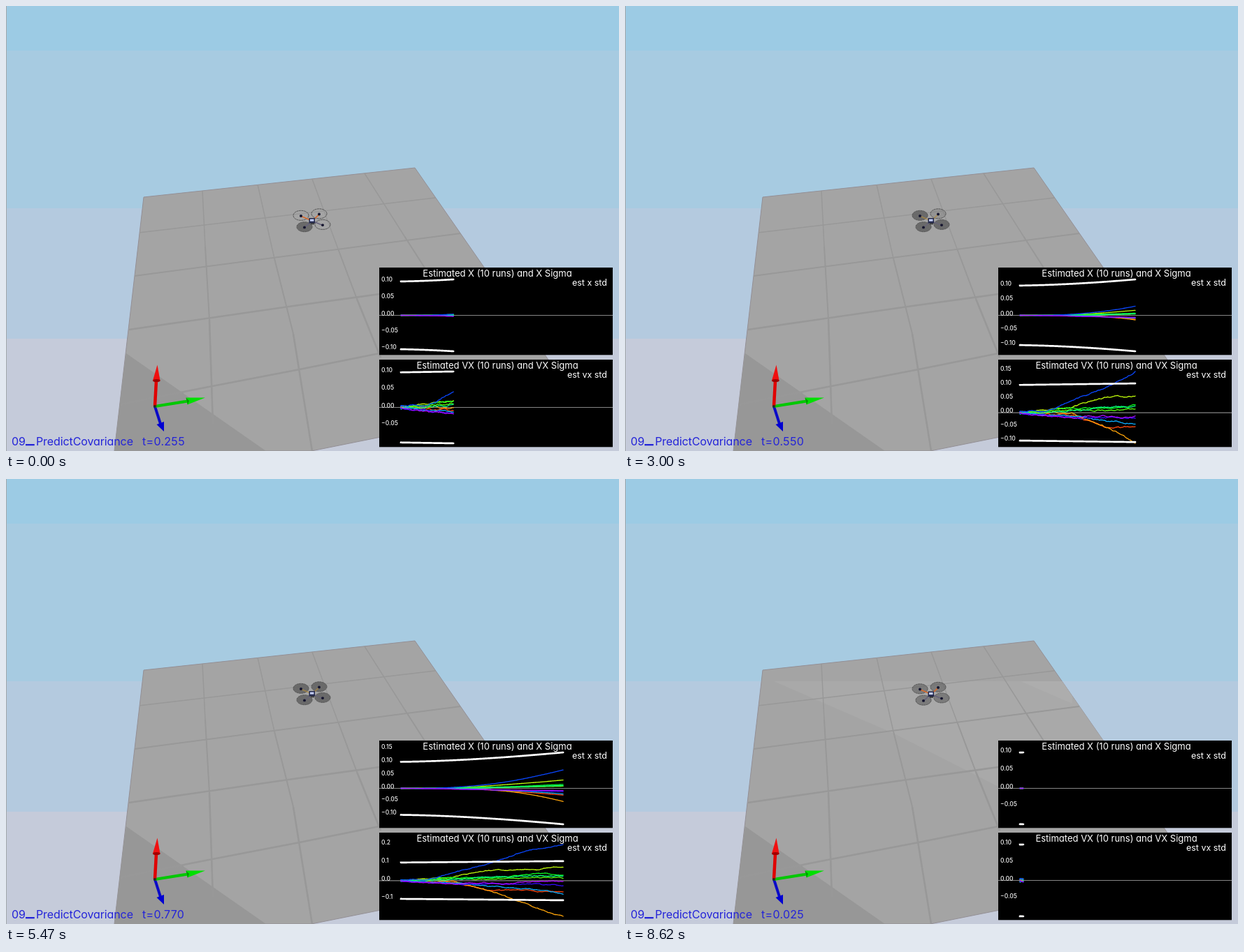
An HTML page for the animation above (8.72 s loop, 877 by 638 pixels).

```html
<!DOCTYPE html>
<html lang="en">
<head>
<meta charset="utf-8">
<title>Covariance prediction</title>
<style>
html, body { margin: 0; width: 100%; height: 100%; overflow: hidden; background: #a7cbe0; }
svg { display: block; width: 877px; height: 638px; }
text { font-family: Inter, "Open Sans", sans-serif; font-feature-settings: "cv11"; white-space: pre; }
.title { font-size: 13px; fill: #fff; text-anchor: middle; }
.legend { font-size: 12.5px; fill: #fff; text-anchor: end; }
.tick { font-size: 8.5px; font-weight: 500; fill: #f4f4f4; }
.status { font-size: 16px; fill: #2424d8; }
.run { fill: none; stroke-width: 1.3; stroke-linejoin: round; stroke-linecap: round; }
.std { fill: none; stroke: #fff; stroke-width: 2.7; stroke-linecap: round; }
.grid { fill: none; stroke: #989898; }
</style>
</head>
<body>
<svg id="stage" viewBox="0 0 877 638" xmlns="http://www.w3.org/2000/svg">
  <defs><clipPath id="floorClip"><path d="M197 274L585 232L814 562L437 638H155Z"/></clipPath></defs>
  <g id="sky">
    <rect width="877" height="64" fill="#9ccbe4"/>
    <rect y="64" width="877" height="226" fill="#a7cbe1"/>
    <rect y="290" width="877" height="187" fill="#b4cadf"/>
    <rect y="477" width="877" height="161" fill="#c5cbda"/>
    <rect width="1" height="638" fill="#a3a8ac"/>
  </g>
  <g id="floor">
    <path d="M197 274L585 232L814 562L437 638H155Z" fill="#a4a4a4" stroke="#938f95" stroke-width="1"/>
    <g clip-path="url(#floorClip)">
      <path id="glow" d="M213 290H640L700 390L534 441L385 365Z" fill="#a9a9a9"/>
      <path id="glow2" d="M566 290H640V322Z" fill="#adadad"/>
      <path d="M172 498L372 638H150Z" fill="#979797"/>
      <g class="grid">
        <path stroke-width="1.5" d="M281 265L285 345M360 256L384 362M438 248L475 348M513 240L570 330M190 325L614 275"/>
        <path stroke-width="2" d="M285 345L291 450M384 362L411 470M475 348L502 420M570 330L602 380M184 387L650 326"/>
        <path stroke-width="2.6" d="M291 450L296 600M411 470L438 638M502 420L536 504M176 464L411 430L534 413M160 572L290 546L420 521L534 498"/>
      </g>
    </g>
  </g>
  <g id="drone"></g>
  <g id="axes">
    <path d="M213 574L221 599" stroke="#0a0ac8" stroke-width="4"/>
    <path d="M215.5 600L226 596L226 610Z" fill="#0000d2"/>
    <path d="M213 574L260 566.5" stroke="#00c800" stroke-width="4"/>
    <path d="M257.5 561.5L285 561.5L259.500 571.500Z" fill="#00e000"/>
    <path d="M257.500 561.500L260 571.500L262 566Z" fill="#009800"/>
    <path d="M213 574L215 537" stroke="#e00000" stroke-width="4.500"/>
    <path d="M210 537L216.500 514.500L220.500 537Q215 541 210 537Z" fill="#f01010"/>
    <ellipse cx="215.300" cy="537" rx="5.300" ry="2" fill="#a00000"/>
    <circle cx="213" cy="574" r="2" fill="#203020"/>
  </g>
  <g id="plots"></g>
  <text class="status" y="630"><tspan x="8">09</tspan><tspan x="28" y="628" font-size="28">_</tspan><tspan x="43" y="630" letter-spacing="-.1">PredictCovariance</tspan></text>
  <text class="status" id="clock" x="195" y="630" letter-spacing=".3"></text>
</svg>
<script>
const LOOP = 8720, DT = 0.005, SAMPLES = 205;
const $ = id => document.getElementById(id);

function add(parent, tag, attrs, text) {
  const el = document.createElementNS('http://www.w3.org/2000/svg', tag);
  for (const k in attrs) el.setAttribute(k, attrs[k]);
  if (text !== undefined) el.textContent = text;
  parent.appendChild(el);
  return el;
}

// piecewise linear curve through (xs, ys)
function lerp(xs, ys, x) {
  let i = 1;
  while (i < xs.length - 1 && x > xs[i]) i++;
  const u = (x - xs[i - 1]) / (xs[i] - xs[i - 1]);
  return ys[i - 1] + (ys[i] - ys[i - 1]) * u;
}

let seed = 20;
function random() {
  seed = (seed * 1664525 + 1013904223) % 4294967296;
  return seed / 4294967296;
}

// picture changes: [first, last, count] in ms
const changes = [
  [150, 1100, 8], [1250, 2190, 8], [2340, 3260, 8], [3400, 4390, 8],
  [4530, 5470, 8], [5600, 6570, 8], [6710, 7620, 8], [7770, 8620, 7]
].flatMap(([a, b, n]) => Array.from({ length: n }, (_, i) => a + (b - a) * i / (n - 1)));

const stepKeys = [0, 13, 22, 30, 40, 56, 60, 61, 63];
const simKeys = [.255, .42, .55, .645, .77, .95, 1, .005, .025];
const simTime = step => Math.round(lerp(stepKeys, simKeys, step) / DT) * DT;

// velocity of each run in thousandths at the knots
const knots = [0, .12, .255, .42, .55, .645, .77, .95, 1.03];
const runs = [
  { hue: 15, v: [2, -8, -10, -50, -54, -57, -60, -65, -64] },
  { hue: 38, v: [0, -3, -2, -52, -106, -149, -196, -244, -256] },
  { hue: 75, v: [-2, 5, 20, 55, 62, 67, 77, 100, 104] },
  { hue: 100, v: [1, 8, 10, 10, 15, 19, 10, 20, 22] },
  { hue: 125, v: [0, 8, 18, 19, 27, 38, 30, 46, 42] },
  { hue: 150, v: [-1, 2, 8, 20, 20, 25, 28, 23, 25] },
  { hue: 200, v: [3, -10, -10, -30, -37, -54, -73, -80, -78] },
  { hue: 225, v: [2, 2, 44, 92, 145, 174, 200, 230, 238] },
  { hue: 250, v: [-3, -8, -20, -20, -22, -20, -27, -14, -12] },
  { hue: 280, v: [0, -12, -16, -12, -10, -3, -5, -10, -8] }
];
for (const run of runs) {
  let noise = 0, x = 0;
  run.vx = [];
  run.x = [];
  for (let i = 0; i < SAMPLES; i++) {
    noise = noise * .9 + (random() - .5) * .004;
    const v = lerp(knots, run.v, i * DT) / 1000 + noise;
    x += v * DT;
    run.vx.push(v);
    run.x.push(x);
  }
}

const px = i => Math.max(565, 562.3 + 305 * i * DT);

function line(count, value) {
  let d = 'M565 ' + value(0).toFixed(2);
  for (let i = 1; i <= count; i++) d += 'L' + px(i).toFixed(1) + ' ' + value(i).toFixed(2);
  return d;
}

function makePlot(top, title, legend, key, std) {
  const g = add($('plots'), 'g', {});
  add(g, 'rect', { x: 534, y: top, width: 334, height: 125.3, fill: '#000' });
  const axis = add(g, 'path', { stroke: '#858585', 'stroke-width': 1.1 });
  const paths = runs.map(r => add(g, 'path', { class: 'run', stroke: `hsl(${r.hue} 100% 52%)` }));
  const upper = add(g, 'path', { class: 'std' });
  const lower = add(g, 'path', { class: 'std' });
  add(g, 'text', { class: 'title', x: 703, y: top + 13.3 }, title);
  add(g, 'text', { class: 'legend', x: 860, y: top + 26 }, legend);
  const ticks = add(g, 'g', {});

  return t => {
    const n = Math.round(t / DT);
    let hi = std(t), lo = -hi;
    for (const r of runs) {
      for (let i = 0; i <= n; i++) {
        hi = Math.max(hi, r[key][i]);
        lo = Math.min(lo, r[key][i]);
      }
    }
    const scale = 103 / (hi - lo), zero = top + 17 + hi * scale;
    const y = v => zero - v * scale;
    axis.setAttribute('d', `M534 ${zero}H868`);
    paths.forEach((p, k) => p.setAttribute('d', line(n, i => y(runs[k][key][i]))));
    upper.setAttribute('d', line(n, i => y(std(i * DT))));
    lower.setAttribute('d', line(n, i => y(-std(i * DT))));

    const coarse = hi - lo > .35, step = coarse ? .1 : .05;
    const minusZero = !coarse && (top + 125 - zero) / scale > .165;
    ticks.textContent = '';
    for (let k = -5; k <= 5; k++) {
      const at = y(k * step), off = at - 3 - top;
      if (off < 4 || off > 115.7) continue;
      const sign = k < 0 || (k === 0 && minusZero) ? '\u2212' : '';
      const label = sign + Math.abs(k * step).toFixed(coarse ? 1 : 2);
      add(ticks, 'text', { class: 'tick', x: 537, y: at }, label);
    }
  };
}

const plots = [
  makePlot(375, 'Estimated X (10 runs) and X Sigma', 'est x std', 'x',
    t => Math.sqrt(.01 + .002 * t + .0116 * t * t)),
  makePlot(507, 'Estimated VX (10 runs) and VX Sigma', 'est vx std', 'vx',
    t => .1 + .01 * t)
];

// rotors: centre and the sim times over which the disc fills in
const drone = $('drone');
const rotors = [[422, 300.3, .38, .46], [448, 297.8, .53, .6], [427, 316.7, -1, 0], [453, 313.4, .44, .52]]
  .map(([x, y, from, to]) => {
    const disc = add(drone, 'ellipse', {
      cx: x, cy: y, rx: 11, ry: 7, fill: '#626262', stroke: '#555', 'stroke-width': 1, 'stroke-dasharray': '3 .6'
    });
    return { x, y, from, to, disc };
  });
const arms = rotors.map(r => add(drone, 'path', { d: `M438 308L${r.x} ${r.y + 1}`, 'stroke-width': 1.6 }));
for (const r of rotors) add(drone, 'ellipse', { cx: r.x, cy: r.y + .7, rx: 2, ry: 1.9, fill: '#15152e' });
add(drone, 'rect', { x: 433.5, y: 304, width: 8.5, height: 7.5, fill: '#23284a' });
add(drone, 'rect', { x: 435, y: 305.5, width: 5.5, height: 3.2, fill: '#c4cdf4' });
add(drone, 'path', { d: 'M436 312.300H441', stroke: '#333', 'stroke-width': 1.8 });

function drawDrone(t) {
  const restart = t < .05;
  for (const r of rotors) {
    const fill = restart ? .75 : Math.min(1, Math.max(0, (t - r.from) / (r.to - r.from)));
    r.disc.setAttribute('fill-opacity', fill * .88);
  }
  arms.forEach((arm, i) => {
    const front = t > .5 ? '#b08a3c' : '#d8692c';
    arm.setAttribute('stroke', i < 2 ? front : '#66627c');
    arm.setAttribute('stroke-opacity', t > .5 ? .7 : 1);
  });
  drone.setAttribute('transform', `translate(0 ${restart ? .5 : 0})`);
}

let shown = -1;
function draw(ms) {
  const step = changes.filter(c => c <= ms + .01).length;
  if (step === shown) return;
  shown = step;
  const t = simTime(step);
  const lit = t < .05 ? 'visible' : 'hidden';
  $('glow').setAttribute('visibility', lit);
  $('glow2').setAttribute('visibility', lit);
  $('clock').textContent = 't=' + t.toFixed(3);
  plots.forEach(plot => plot(t));
  drawDrone(t);
}

const start = performance.now();
function tick() {
  draw((performance.now() - start) % LOOP);
  requestAnimationFrame(tick);
}
tick();
</script>
</body>
</html>
```
